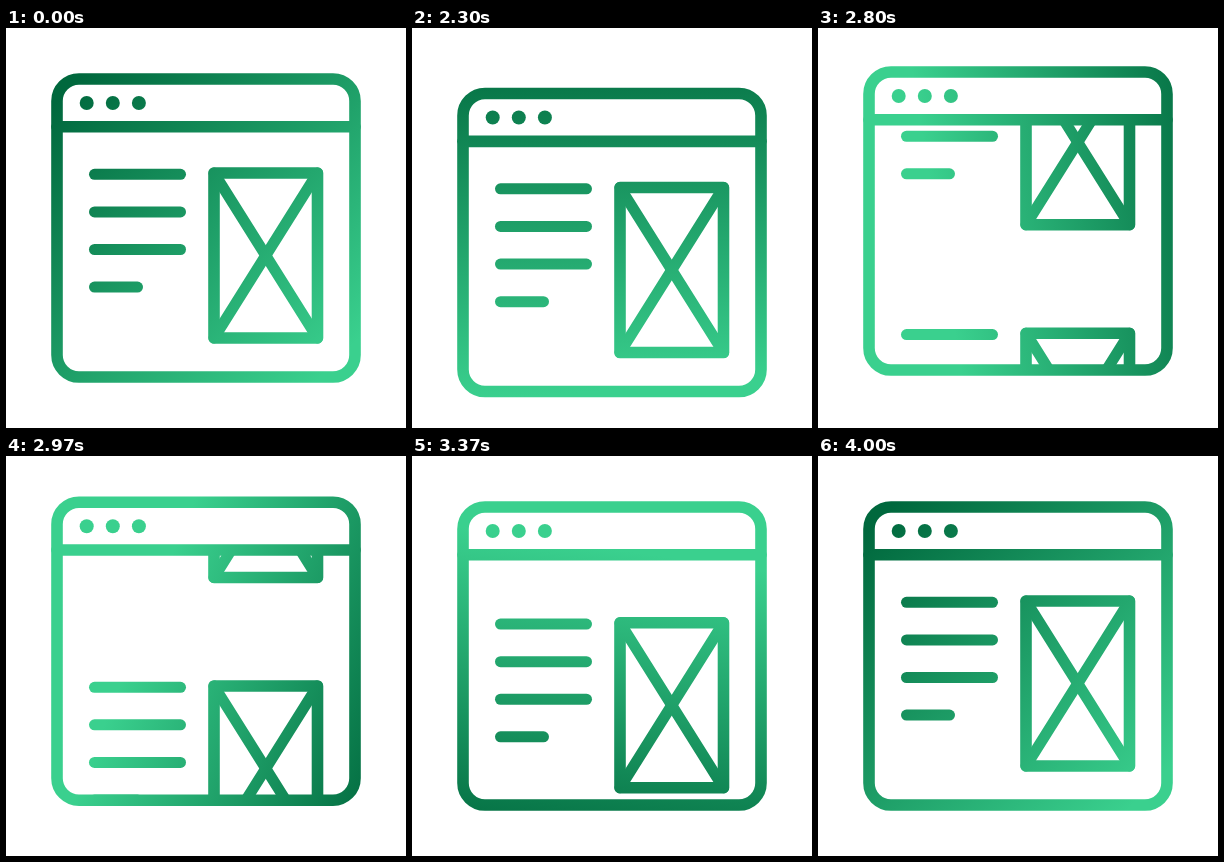
Recreate the animation shown at these times as an HTML page with a canvas. Size 400 px wide and 400 px high, loop 4020 ms.

```html
<!DOCTYPE html>
<html lang="en">
<head>
<meta charset="utf-8">
<title>Scrolling wireframe</title>
<style>
  html, body { margin: 0; width: 100%; height: 100%; overflow: hidden; background: #fff; }
  canvas { display: block; width: 400px; height: 400px; }
</style>
</head>
<body>
<canvas id="stage" width="400" height="400"></canvas>
<script>
const ctx = document.getElementById('stage').getContext('2d');
const LOOP = 4020, REST = 2000, SPIN = 2000, PAGE = 273.5;
const DARK = '#00683d', LIGHT = '#3ad08e';

// Progress from 0 to 1 between two times, like cubic-bezier(x1, 0, x2, 1).
function ease(t, from, to, x1 = 0.37, x2 = 0.63) {
  const x = Math.min(1, Math.max(0, (t - from) / (to - from)));
  let lo = 0, hi = 1, s = 0.5;
  for (let i = 0; i < 24; i++) {
    s = (lo + hi) / 2;
    const r = 1 - s;
    if (3 * r * r * s * x1 + 3 * r * s * s * x2 + s * s * s < x) lo = s;
    else hi = s;
  }
  return s * s * (3 - 2 * s);
}

// The window dips, is flung up, then settles.
const bounce = t =>
  15 * ease(t, 2000, 2340) - 22 * ease(t, 2430, 2800) + 7 * ease(t, 2800, 3250);

const scroll = t => PAGE * ease(t, 2335, 4000, 0.43, 0.07);

// The gradient axis makes one turn, shorter and off centre halfway round.
function makePaint(t) {
  const u = Math.max(0, t - REST) / SPIN;
  const angle = Math.PI * (0.25 + 2 * u ** 1.15);
  const wave = Math.cos(2 * Math.PI * u);
  const half = 168 + 23 * wave, shift = 40 * (1 - wave);
  const point = d => [197 + d * Math.cos(angle), 197 + d * Math.sin(angle)];
  const paint = ctx.createLinearGradient(...point(-half - shift), ...point(half - shift));
  paint.addColorStop(0, DARK);
  paint.addColorStop(1, LIGHT);
  return paint;
}

function line(x1, y1, x2, y2) {
  ctx.beginPath();
  ctx.moveTo(x1, y1);
  ctx.lineTo(x2, y2);
  ctx.stroke();
}

function drawPage(y) {
  ctx.lineWidth = 11;
  for (let i = 0; i < 4; i++) {
    const row = y + 146.3 + i * 37.6;
    line(88.5, row, i < 3 ? 174.5 : 131.5, row);
  }
  line(208, y + 145, 311.5, y + 310);
  line(311.5, y + 145, 208, y + 310);
  ctx.lineWidth = 11.6;
  ctx.strokeRect(208, y + 145, 103.5, 165);
}

function drawWindow(y) {
  ctx.lineWidth = 11.6;
  ctx.beginPath();
  ctx.roundRect(51, y + 51, 298, 298, 22);
  ctx.stroke();
  line(51, y + 98.8, 349, y + 98.8);
  for (let i = 0; i < 3; i++) {
    ctx.beginPath();
    ctx.arc(80.7 + i * 26.1, y + 75, 7, 0, Math.PI * 2);
    ctx.fill();
  }
}

function draw(t) {
  const dy = bounce(t), top = dy - scroll(t);

  ctx.fillStyle = '#fff';
  ctx.fillRect(0, 0, 400, 400);
  ctx.fillStyle = ctx.strokeStyle = makePaint(t);
  ctx.lineCap = ctx.lineJoin = 'round';

  ctx.save();
  ctx.beginPath();
  ctx.rect(51, dy + 98.8, 298, 250);
  ctx.clip();
  drawPage(top);
  drawPage(top + PAGE);
  ctx.restore();
  drawWindow(dy);
}

const start = performance.now();
function tick() {
  draw((performance.now() - start) % LOOP);
  requestAnimationFrame(tick);
}
tick();
</script>
</body>
</html>
```
